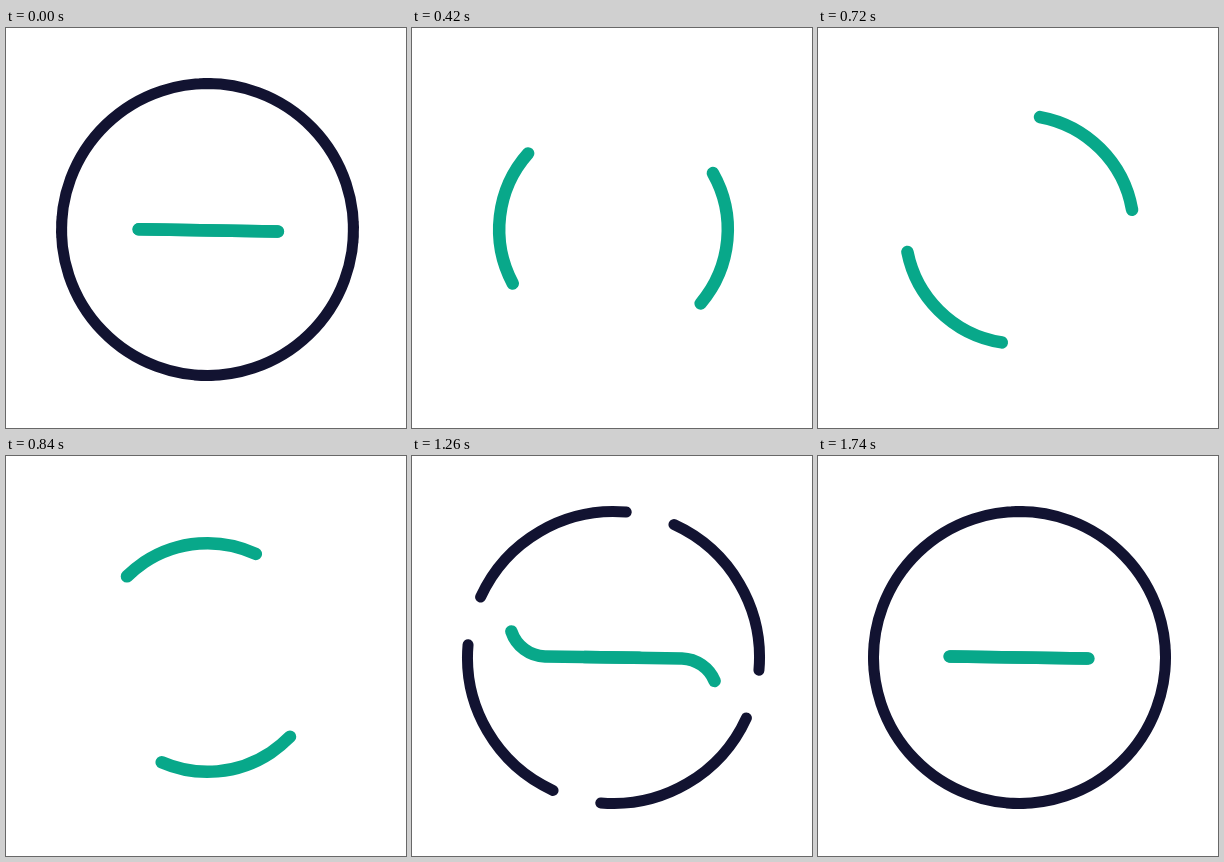
These frames come from a looping animation (400 px wide and 400 px high, 3860 ms). An HTML page:

```html
<!DOCTYPE html>
<html lang="en">
<head>
<meta charset="utf-8">
<title>Minus</title>
<style>
  html, body { margin: 0; width: 100%; height: 100%; overflow: hidden; background: #fff; }
  svg { display: block; width: 100vw; height: 100vh; }
  path { fill: none; stroke-linecap: round; stroke-linejoin: round; }
  #ring { stroke: #121331; stroke-width: 11; }
  .dash { stroke: #08a88a; stroke-width: 12.5; }
</style>
</head>
<body>
<svg viewBox="0 0 400 400">
  <path id="ring"/>
  <path class="dash"/>
  <path class="dash"/>
</svg>
<script>
const LOOP = 3860, STEP = 30, END = 1740;
const CENTER = 201.5, RING = 146, ORBIT = 114.3, DASH = 139;

const ring = document.getElementById('ring');
const dashes = [...document.querySelectorAll('.dash')];

// Clockwise from the top, in degrees.
function polar(radius, deg) {
  const a = deg * Math.PI / 180;
  return [CENTER + radius * Math.sin(a), CENTER - radius * Math.cos(a)];
}

// Each dash leaves the line, circles counter-clockwise and returns to the line.
const starts = [
  'M271.5 203.5L133 201.3A37 37 0 0 0 95.6 237C95.6 254 107 269 ',
  'M133 201.3L271.5 203.5A37 37 0 0 0 309 167C309 150 297 134 '
];

function dashPath(start, flip) {
  const at = (x, y) => flip ? `${2 * CENTER - x} ${2 * CENTER - y} ` : `${x} ${y} `;
  const arc = (r, x, y) => `A${r} ${r} 0 0 0 ` + at(x, y);
  const orbit = deg => arc(ORBIT, ...polar(ORBIT, deg));
  // Quarter turns keep every arc centred exactly.
  return start + at(...polar(ORBIT, 225))
    + [135, 45, -45, -135, -213.6].map(orbit).join('')
    + 'C' + at(286, 282) + at(305.5, 260) + at(305.5, 240)
    + arc(36.8, 270, 202.5) + 'L' + at(132.5, 200.5);
}

dashes.forEach((dash, i) => {
  dash.setAttribute('d', dashPath(starts[i], i === 1));
  dash.setAttribute('stroke-dasharray', `${DASH} 5000`);
});

// [time in ms, distance travelled, speed]
const travel = [
  [0, 0, 0], [210, 110.5, 1.2], [600, 741.5, 1.5], [840, 1009, 0.7],
  [1080, 1124.5, 0.47], [1260, 1210.5, 0.33], [END, 1253.5, 0]
];

function distance(t) {
  const i = Math.max(1, travel.findIndex(k => k[0] >= t));
  const [t0, s0, v0] = travel[i - 1], [t1, s1, v1] = travel[i];
  const d = t1 - t0, u = (t - t0) / d, w = 1 - u;
  return s0 * w * w * (1 + 2 * u) + s1 * u * u * (3 - 2 * u)
    + d * u * w * (v0 * w - v1 * u);
}

function ringPath(from, to) {
  return [0, 90, 180, 270].map(q =>
    `M${polar(RING, from + q)}A${RING} ${RING} 0 0 1 ${polar(RING, to + q)}`).join('');
}

// Four quarter arcs retract to their start, then regrow from their end.
function ringAt(t) {
  const span = 98;
  if (t < 270) return ringPath(-3, -3 + span * (1 - (t / 270) ** 2));
  if (t > 990) return ringPath(5 - span * (1 - ((END - t) / 750) ** 2.85), 5);
  return '';
}

function draw(now) {
  const t = Math.min(END, Math.floor((now % LOOP) / STEP) * STEP);
  ring.setAttribute('d', ringAt(t));
  const offset = -distance(t);
  dashes.forEach(dash => dash.setAttribute('stroke-dashoffset', offset));
}

const begin = performance.now();
function tick() {
  draw(performance.now() - begin);
  requestAnimationFrame(tick);
}
tick();
</script>
</body>
</html>
```
